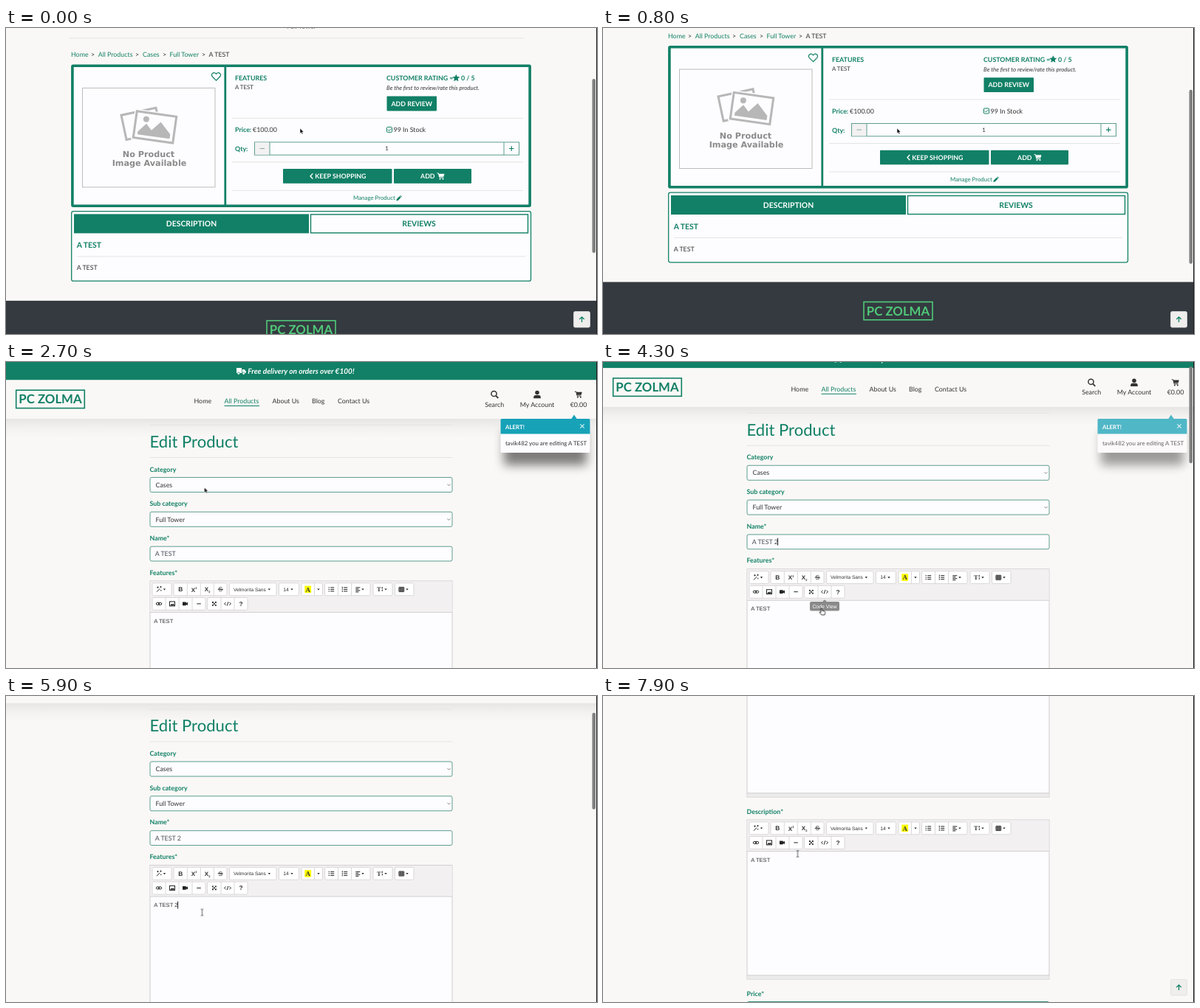
Write an HTML page that moves like this. It is 800 by 415 pixels and loops after 8000 ms.

```html
<!DOCTYPE html>
<html lang="en">
<head>
<meta charset="utf-8">
<title>Edit product</title>
<style>
@property --s { syntax: '<length>'; inherits: true; initial-value: 0px; }
html, body { margin: 0; width: 100%; height: 100%; overflow: hidden; background: #faf8f6; }
svg.stage { display: block; width: 100vw; height: 100vh; animation: scroll 8s linear infinite; }
text { font: 8.85px Lato, sans-serif; fill: #333; text-rendering: geometricPrecision; white-space: pre; }
.b { font-weight: 700; }
.i { font-style: italic; }
.m { text-anchor: middle; }
.sm { font-size: 7.86px; }
.tab { font-size: 10.4px; }
.logo { font-size: 16.8px; }
.h1 { font-size: 22.1px; }
.ui { font-family: 'Liberation Sans', Arial, sans-serif; font-size: 6.5px; }
.ed { font-family: 'Liberation Sans', Arial, sans-serif; font-size: 7.6px; }
.g { fill: #118066; }
.w { fill: #fff; }
.ln { fill: none; stroke: #118066; }
.hr { fill: none; stroke: #e6e4e4; }
.field { fill: #fdfcfe; stroke: #5d9e90; }
.chev { fill: none; stroke: #777; stroke-width: .9; }
.btn { fill: #fff; stroke: #d6d4d5; stroke-width: .9; }
.ink { fill: none; stroke: #222; stroke-width: 1; }
.blk { fill: #222; }
.thumb { fill: #808080; }

.page { transform: translateY(calc(var(--s) * -1)); }
.shop .thumb { transform: translateY(calc(var(--s) * .58)); }
.edit .thumb { transform: translateY(calc(var(--s) * .322)); }

.shop, .edit, .arrow, .hand, .beam, .up, .tip, .name2, .car1, .car2, .feat2, .car3, .car4 {
  animation: 8s step-end infinite;
}
.shop { animation-name: shop; }
.edit { animation-name: edit; }
.arrow { animation-name: arrow; }
.hand { animation-name: hand; }
.beam { animation-name: beam; }
.up { animation-name: up; }
.tip { animation-name: tip; }
.name2 { animation-name: name2; }
.car1 { animation-name: car1; }
.car2 { animation-name: car2; }
.feat2 { animation-name: feat2; }
.car3 { animation-name: car3; }
.car4 { animation-name: car4; }
.shop .bar { animation: barA 8s linear infinite; }
.edit .bar { animation: barB 8s linear infinite; }
.toast { animation: toast 8s linear infinite; }
.mouse { animation: mouse 8s linear infinite; }

@keyframes scroll {
  0% { --s: 0px } 1.25% { --s: 12px } 2.5%, 6.25% { --s: 22px } 7.5% { --s: 23.5px }
  8.75% { --s: 24.8px } 10%, 26.24% { --s: 25.5px } 26.25%, 52.5% { --s: 0px }
  53.75% { --s: 16px } 55% { --s: 38px } 56.25% { --s: 55px } 57.5% { --s: 64px }
  58.75%, 73.75% { --s: 67px } 75% { --s: 120px } 76.25% { --s: 220px }
  77.5% { --s: 310px } 78.75% { --s: 358px } 80%, 100% { --s: 376px }
}
@keyframes mouse {
  0%, 11.25% { transform: translate(398px, 136px) }
  16.25% { transform: translate(452px, 180px) }
  21.25%, 26.25% { transform: translate(489px, 205px) }
  33.75% { transform: translate(268.5px, 170px) }
  36.25% { transform: translate(262px, 203px) }
  40%, 48.75% { transform: translate(232px, 261px) }
  51.25%, 55% { transform: translate(295.5px, 334px) }
  58.75% { transform: translate(290px, 298px) }
  62.5%, 76.25% { transform: translate(265.5px, 293.5px) }
  80% { transform: translate(265.3px, 286px) }
  83.75%, 100% { transform: translate(263.5px, 214px) }
}
@keyframes shop { 0% { visibility: visible } 26.25%, 100% { visibility: hidden } }
@keyframes edit { 0% { visibility: hidden } 26.25%, 100% { visibility: visible } }
@keyframes arrow {
  0% { visibility: visible } 20% { visibility: hidden } 26.25% { visibility: visible }
  38.75% { visibility: hidden } 48.75% { visibility: visible } 50%, 100% { visibility: hidden }
}
@keyframes hand {
  0% { visibility: hidden } 20% { visibility: visible } 26.25% { visibility: hidden }
  50% { visibility: visible } 56.25%, 100% { visibility: hidden }
}
@keyframes beam {
  0% { visibility: hidden } 38.75% { visibility: visible } 45% { visibility: hidden }
  56.25%, 100% { visibility: visible }
}
@keyframes up { 0% { visibility: visible } 26.25% { visibility: hidden } 76.25%, 100% { visibility: visible } }
@keyframes tip { 0% { visibility: hidden } 50% { visibility: visible } 56.25%, 100% { visibility: hidden } }
@keyframes name2 { 0% { visibility: hidden } 45%, 100% { visibility: visible } }
@keyframes car1 { 0% { visibility: hidden } 40% { visibility: visible } 45%, 100% { visibility: hidden } }
@keyframes car2 { 0% { visibility: hidden } 45% { visibility: visible } 62.5%, 100% { visibility: hidden } }
@keyframes feat2 { 0% { visibility: hidden } 68.75%, 100% { visibility: visible } }
@keyframes car3 { 0% { visibility: hidden } 63.75% { visibility: visible } 68.75%, 100% { visibility: hidden } }
@keyframes car4 { 0% { visibility: hidden } 68.75%, 100% { visibility: visible } }
@keyframes barA { 0%, 12.5% { opacity: 1 } 16.25%, 100% { opacity: 0 } }
@keyframes barB {
  0%, 51.25% { opacity: 0 } 52.5%, 61.25% { opacity: 1 } 65%, 72.5% { opacity: 0 }
  73.7%, 87.5% { opacity: 1 } 90%, 100% { opacity: 0 }
}
@keyframes toast {
  0%, 28.75% { opacity: 0 } 31.25%, 52.5% { opacity: 1 } 53.75% { opacity: .75 } 56.25%, 100% { opacity: 0 }
}
</style>
</head>
<body>
<svg class="stage" viewBox="0 0 800 415">
  <defs>
    <linearGradient id="shade" x2="0" y2="1">
      <stop stop-color="#000" stop-opacity=".075"/>
      <stop offset=".5" stop-color="#000" stop-opacity=".025"/>
      <stop offset="1" stop-color="#000" stop-opacity="0"/>
    </linearGradient>
    <filter id="blur" x="-30%" y="-60%" width="160%" height="220%"><feGaussianBlur stdDeviation="7"/></filter>
    <g id="cart">
      <path d="M0 .6h1.9l1.5 5.9h5.4" fill="none" stroke="currentColor"/>
      <path d="M2 1.3h8l-1.2 4H3z" fill="currentColor"/>
      <circle cx="4" cy="8.3" r="1" fill="currentColor"/><circle cx="8" cy="8.3" r="1" fill="currentColor"/>
    </g>
    <path id="caret" class="blk" d="M-1.7 -1h3.4l-1.7 2.1z"/>

    <g id="editor">
      <rect x="195" y=".5" width="409" height="216" fill="#fdfcfe" stroke="#cfcdce"/>
      <rect x="195.5" y="1" width="408" height="42" fill="#f2f0f1"/>
      <path d="M195 43h409" stroke="#d2d0d1"/>
      <rect x="195.5" y="211.5" width="408" height="4.5" fill="#ecebec"/>
      <path d="M195 211.3h409" stroke="#cfcdce"/>
      <g class="btn">
        <rect x="198" y="3.3" width="26" height="17" rx="1.5"/>
        <rect x="227" y="3.3" width="72" height="17" rx="1.5"/>
        <rect x="302.5" y="3.3" width="63.5" height="17" rx="1.5"/>
        <rect x="369.5" y="3.3" width="27" height="17" rx="1.5"/>
        <rect x="400" y="3.3" width="28.5" height="17" rx="1.5"/>
        <rect x="431.5" y="3.3" width="61.5" height="17" rx="1.5"/>
        <rect x="497" y="3.3" width="26" height="17" rx="1.5"/>
        <rect x="526.5" y="3.3" width="25.5" height="17" rx="1.5"/>
        <rect x="198" y="23" width="72" height="17" rx="1.5"/>
        <rect x="272.5" y="23" width="54.5" height="17" rx="1.5"/>
        <path d="M245.3 3.3v17m18 0v-17m18 0v17M417.5 3.3v17M449.5 3.3v17m18 0v-17M216 23v17m18 0v-17m18 0v17M291 23v17m18 0v-17"/>
      </g>
      <path class="ink" d="M204 15.2l4.3-4.3" stroke-width="1.6"/>
      <path class="ink" d="M205.5 8v2.2m-1.1-1.1h2.2M209.5 7.6v2m-1-1h2M209.8 12.5v1.6"  stroke-width=".7"/>
      <use href="#caret" x="214.5" y="12"/>
      <text class="ui b m" x="236.3" y="14.8" style="font-size:8.4px">B</text>
      <text class="ui b" x="250.8" y="15" style="font-size:8px">X<tspan dy="-3.5" style="font-size:4px">2</tspan></text>
      <text class="ui b" x="268.8" y="14.6" style="font-size:8px">X<tspan dy="2" style="font-size:4px">2</tspan></text>
      <text class="ui m" x="290.3" y="14.8" style="font-size:8.4px">S</text>
      <path class="ink" d="M286.8 11.8h7" stroke-width=".8"/>
      <text class="ui" x="308" y="14">Velmorita Sans</text>
      <use href="#caret" x="356.3" y="12"/>
      <text class="ui" x="375.3" y="14" style="font-size:6.8px">14</text>
      <use href="#caret" x="387" y="12"/>
      <rect x="404.3" y="7" width="8.8" height="9.6" fill="#ff0"/>
      <text class="b m" x="408.7" y="15" style="font-family:'Liberation Serif',serif;font-size:9px">A</text>
      <use href="#caret" x="423" y="12"/>
      <path class="ink" d="M439.2 9.4h5m-5 2.5h5m-5 2.5h5M457.2 9.4h5m-5 2.5h5m-5 2.5h5M473.3 9.4h6m-6 2h4m-4 2h6m-6 2h4"/>
      <path class="ink" d="M436.6 9.4h1.4m-1.4 2.5h1.4m-1.4 2.5h1.4M455.3 8.3v2m0 .7v1.7m0 .8v1.8" stroke-width="1.1"/>
      <use href="#caret" x="483" y="12"/>
      <text class="b" x="502" y="14.9" style="font-family:'Liberation Serif',serif;font-size:8.5px">T</text>
      <path class="ink" d="M509.3 8.6v6.2" stroke-dasharray="2.4 1"/>
      <use href="#caret" x="514" y="12"/>
      <path class="ink" d="M532 9h6.6v6H532zM532 11h6.6M532 13h6.6M534.2 9v6m2.2-6v6" stroke-width=".75"/>
      <use href="#caret" x="543" y="12"/>
      <rect class="ink" x="203.3" y="29.9" width="4.2" height="3" rx="1.5"/>
      <rect class="ink" x="206.5" y="29.9" width="4.2" height="3" rx="1.5"/>
      <rect class="ink" x="221.5" y="28.4" width="7" height="6" stroke-width=".8"/>
      <path class="blk" d="M222.2 33.8l2-2.6 1.2 1.3 1.2-1.7 1.4 3z"/>
      <path class="blk" d="M239 29h4.8v1.5l2.2-1.3v4.4l-2.2-1.3v1.5H239z"/>
      <path class="ink" d="M258.3 31.4h5.5" stroke-width="1.2"/>
      <path class="ink" d="M279.3 28.9l5 5m0-5l-5 5" stroke-width=".8"/>
      <path class="blk" d="M279 28.6h2.3L279 30.9zM284.7 28.6v2.3l-2.3-2.3zM279 34.2v-2.3l2.3 2.3zM284.7 34.2h-2.3l2.3-2.3z"/>
      <path class="ink" d="M297.6 29.4l-2 2 2 2m4.8-4l2 2-2 2m-1.6-4.6l-1.5 5.2" stroke-width=".9"/>
      <text class="ui b m" x="318" y="34.5" style="font-size:8.4px">?</text>
    </g>
  </defs>

  <rect width="800" height="415" fill="#faf8f6"/>

  <g class="shop">
    <g class="page">
      <text class="m" x="400" y=".8" style="fill:#777">Full Tower</text>
      <path class="hr" d="M85 14h616"/>
      <text class="g" x="88" y="39.6">Home</text><text x="115" y="39.6">&gt;</text>
      <text class="g" x="124.7" y="39.6">All Products</text><text x="175" y="39.6">&gt;</text>
      <text class="g" x="185" y="39.6">Cases</text><text x="212" y="39.6">&gt;</text>
      <text class="g" x="221.5" y="39.6">Full Tower</text><text x="265" y="39.6">&gt;</text>
      <text x="274.5" y="39.6">A TEST</text>

      <rect x="89.9" y="51.3" width="619.2" height="190" rx="1" fill="#fdfcfe" stroke="#118066" stroke-width="3.6"/>
      <path class="ln" d="M296.8 51v190" stroke-width="2.8"/>
      <rect x="103.5" y="81.5" width="179.5" height="134.5" fill="none" stroke="#bdbdbd"/>
      <g fill="#fdfcfe" stroke="#b7b7b7" stroke-width="3">
        <rect x="-24" y="-17" width="48" height="34" transform="translate(183 130) rotate(-12)"/>
        <g transform="translate(201.5 134.5) rotate(8)">
          <rect x="-27" y="-18" width="54" height="36" stroke="#fdfcfe" stroke-width="6"/>
          <rect x="-27" y="-18" width="54" height="36"/>
          <path d="M-22 13v-4l10-12 8 8 11-13 15 15v6z" fill="#b7b7b7" stroke="none"/>
          <circle cx="-13" cy="-9" r="4" fill="#b7b7b7" stroke="none"/>
        </g>
      </g>
      <g style="font:700 11.2px 'DejaVu Sans',sans-serif">
        <text class="m" x="193" y="175.6" style="font:inherit;fill:#8b8b8b">No Product</text>
        <text class="m" x="194" y="187.2" style="font:inherit;fill:#8b8b8b">Image Available</text>
      </g>
      <path class="ln" stroke-width="1.2" d="M284.5 71.2l-5.1-5.1c-3-3.3 1.8-7.6 5.1-3.7 3.300-3.900 8.100.4 5.100 3.700z"/>

      <text class="b g" x="310" y="71">FEATURES</text>
      <text class="sm" x="310" y="83.2">A TEST</text>
      <text class="b g" x="515" y="71">CUSTOMER RATING =</text>
      <path class="g" d="M609.300 62.800l1.500 3.200 3.500.4-2.600 2.400.7 3.500-3.100-1.800-3.100 1.800.7-3.500-2.600-2.400 3.500-.4z"/>
      <text class="b g" x="616" y="71">0 / 5</text>
      <text class="sm i" x="515" y="84">Be the first to review/rate this product.</text>
      <rect class="g" x="515.500" y="92.700" width="67.500" height="19.800" rx=".8"/>
      <text class="b w m" x="549.300" y="105.800">ADD REVIEW</text>
      <path class="hr" d="M306 122.500h394M306 182h394M306 220.500h394"/>
      <text class="b g" x="310" y="141.200">Price:</text><text x="334" y="141.200">€100.00</text>
      <rect class="ln" x="515.500" y="134.500" width="7" height="7" rx="1"/>
      <path class="ln" d="M517 138l1.500 1.500 2.800-3"/>
      <text x="524.500" y="141.200">99 In Stock</text>
      <text class="b g" x="310" y="167">Qty:</text>
      <rect class="field" x="336.500" y="155" width="358" height="17.300"/>
      <rect x="337" y="155.500" width="20" height="16.300" fill="#f3f1f2"/>
      <path class="field" d="M357 155v17.300M674 155v17.300"/>
      <path d="M343.500 163.600h6.500" stroke="#88a9a2"/>
      <path class="ln" d="M681 163.600h6.500m-3.250-3.250v6.500" stroke-width="1.200"/>
      <text class="m sm" x="515.500" y="166.600">1</text>
      <rect class="g" x="375" y="191.200" width="147.500" height="19.600" rx=".8"/>
      <rect class="g" x="525" y="191.200" width="105" height="19.600" rx=".8"/>
      <path d="M415.300 197.500l-3.300 3.600 3.300 3.600" fill="none" stroke="#fff" stroke-width="1.400"/>
      <text class="b w" x="418.300" y="204.300">KEEP SHOPPING</text>
      <text class="b w" x="561" y="204.300">ADD</text>
      <use href="#cart" x="583.500" y="196.500" color="#fff"/>
      <text class="sm g" x="470" y="233.600">Manage Product</text>
      <path class="g" d="M528.300 234.400l.5-2.200 4-4 1.800 1.800-4 4zM533.300 227.700l.8-.7 1.700 1.700-.7.800z"/>

      <rect x="88.700" y="248.700" width="621.800" height="94.600" rx="2.500" fill="#fdfcfe" stroke="#118066" stroke-width="1.300"/>
      <rect class="g" x="92" y="252.500" width="318" height="26"/>
      <rect class="ln" x="412.500" y="253" width="294" height="25" stroke-width="1.400"/>
      <text class="b w m tab" x="251" y="269.500">DESCRIPTION</text>
      <text class="b g m tab" x="559" y="269.500">REVIEWS</text>
      <text class="b g tab" x="95.700" y="298.500">A TEST</text>
      <path class="hr" d="M96 310h607"/>
      <text x="95.700" y="328.500">A TEST</text>

      <rect y="370" width="800" height="120" fill="#343a40"/>
      <rect x="353" y="397" width="93" height="24.300" fill="none" stroke="#50c878" stroke-width="1.600"/>
      <text class="m logo" x="399.500" y="415.500" style="fill:#50c878;font-weight:700">PC ZOLMA</text>
    </g>
    <g class="bar"><rect class="thumb" x="793.500" y="69" width="4.500" height="236" rx="2.200"/></g>
  </g>

  <g class="edit">
    <g class="page">
      <rect y="77" width="800" height="26" fill="url(#shade)"/>
      <rect class="g" width="800" height="24.500"/>
      <rect y="24.500" width="800" height="52.500" fill="#faf8f6"/>
      <path class="w" d="M312 8h7v7h-7zM319.700 10h2.800l2.300 2.500V15h-5.100z"/>
      <g fill="#fff" stroke="#118066" stroke-width=".7"><circle cx="314.800" cy="15.600" r="1.700"/><circle cx="321.700" cy="15.600" r="1.700"/></g>
      <text class="b i w" x="327.300" y="16" style="font-size:10.100px">Free delivery on orders over €100!</text>

      <rect class="ln" x="13.700" y="38.200" width="92.600" height="24.400" stroke-width="1.600"/>
      <text class="b g m logo" x="60" y="56.400">PC ZOLMA</text>
      <g class="b">
        <text x="254.500" y="55.900">Home</text>
        <text class="g" x="295.500" y="55.900">All Products</text>
        <text x="360.500" y="55.900">About Us</text>
        <text x="414" y="55.900">Blog</text>
        <text x="449" y="55.900">Contact Us</text>
      </g>
      <path class="ln" d="M295.500 59.500h47.500"/>
      <circle cx="660.500" cy="43" r="3.600" fill="none" stroke="#333" stroke-width="1.500"/>
      <path d="M663 45.700l3.300 3.300" stroke="#333" stroke-width="1.800"/>
      <circle cx="719" cy="41.500" r="2.800" fill="#333"/>
      <path d="M714.200 49.300v-1.500q0-2.800 3-2.800h3.600q3 0 3 2.800v1.500z" fill="#333"/>
      <use href="#cart" x="769.800" y="39.500" color="#333"/>
      <text class="m" x="661.200" y="60.500">Search</text>
      <text class="m" x="719" y="60.500">My Account</text>
      <text class="m" x="775" y="60.500">€0.00</text>

      <path class="hr" d="M194.500 85.500h410M194.500 129.500h410"/>
      <text class="g h1" x="194.500" y="116">Edit Product</text>
      <text class="b g" x="194.500" y="148.700">Category</text>
      <rect class="field" x="195" y="156.500" width="409" height="20" rx="2"/>
      <text x="202.500" y="169.700">Cases</text>
      <text class="b g" x="194.500" y="195.300">Sub category</text>
      <rect class="field" x="195" y="203.300" width="409" height="20" rx="2"/>
      <text x="202.500" y="216.500">Full Tower</text>
      <path class="chev" d="M597.500 165.600l2 2 2-2M597.500 212.400l2 2 2-2"/>
      <text class="b g" x="194.500" y="242">Name*</text>
      <rect class="field" x="195" y="250.200" width="409" height="19.800" rx="2"/>
      <text x="201.700" y="263.300" style="fill:#495057">A TEST<tspan class="name2"> 2</tspan></text>
      <path class="ink car1" d="M229.800 255v10"/>
      <path class="ink car2" d="M236.600 255v10"/>

      <text class="b g" x="194.500" y="288.700">Features*</text>
      <use href="#editor" y="296.500"/>
      <text class="ed" x="200.300" y="353.700">A TEST<tspan class="feat2"> 2</tspan></text>
      <path class="ink car3" d="M227 346v10"/>
      <path class="ink car4" d="M232.600 346v10"/>
      <g class="tip">
        <path d="M300 338.500l2.800 2.800h-5.600z" fill="#8a8a8a"/>
        <rect x="280" y="341.200" width="40" height="12.600" rx="2" fill="#8a8a8a"/>
        <text class="ui w m" x="300" y="350" style="font-size:6.900px">Code View</text>
      </g>

      <text class="b g" x="194.500" y="535.700">Description*</text>
      <use href="#editor" y="543.500"/>
      <text class="ed" x="200.300" y="600.700">A TEST</text>
      <text class="b g" x="194.500" y="782.700">Price*</text>
      <rect x="195" y="790.700" width="409" height="20" rx="2" fill="#fdfcfe" stroke="#118066"/>
    </g>

    <g class="toast">
      <rect x="674" y="94" width="112" height="46" fill="#000" opacity=".5" filter="url(#blur)"/>
      <path d="M769 71.500l4 6h-8z" fill="#17a2b8"/>
      <rect x="669.500" y="77" width="121" height="46" rx="1.500" fill="#fdfcfe"/>
      <path d="M669.500 97.500V78.500q0-1.500 1.500-1.500h118q1.500 0 1.500 1.500v19z" fill="#17a2b8"/>
      <text class="b w sm" x="676" y="90.600">ALERT!</text>
      <path d="M777.300 84.300l5.400 5.400m0-5.400l-5.400 5.400" stroke="#d5eef2" stroke-width="1.200"/>
      <text class="sm" x="676" y="113.200">tavik482 you are editing A TEST</text>
    </g>
    <g class="bar"><rect class="thumb" x="793.500" y="1" width="4.500" height="131" rx="2.200"/></g>
  </g>

  <g class="up">
    <rect x="768.500" y="384.500" width="22" height="21.500" rx="2" fill="#efeeec" stroke="#e0dfdd" stroke-width=".8"/>
    <path class="ln" d="M779.500 399v-7m-3.200 3l3.200-3.200 3.200 3.200" stroke-width="1.300"/>
  </g>
  <rect x="799" width="1" height="415" fill="#1c1c1c"/>

  <g class="mouse">
    <path class="arrow" d="M0 0v7l1.600-1.400 1.100 2.500 1.300-.6-1.100-2.400h2.100z" fill="#111" stroke="#fff" stroke-width=".5"/>
    <path class="hand" d="M-.7 0q.9-.8 1.500 0l.3 3.300 3.400.9q1 .4.800 1.600l-.7 3.200H.3L-2.300 5.800q-.3-1.300 1-.8l.8.700z" fill="#fff" stroke="#111" stroke-width=".8"/>
    <path class="beam" d="M-1.600-4.500q1.600 0 1.600 1.200v6.600q0 1.200-1.600 1.200M1.600-4.500q-1.600 0-1.600 1.200M0 3.300q0 1.200 1.600 1.200" fill="none" stroke="#333" stroke-width=".8"/>
  </g>
</svg>
</body>
</html>
```
